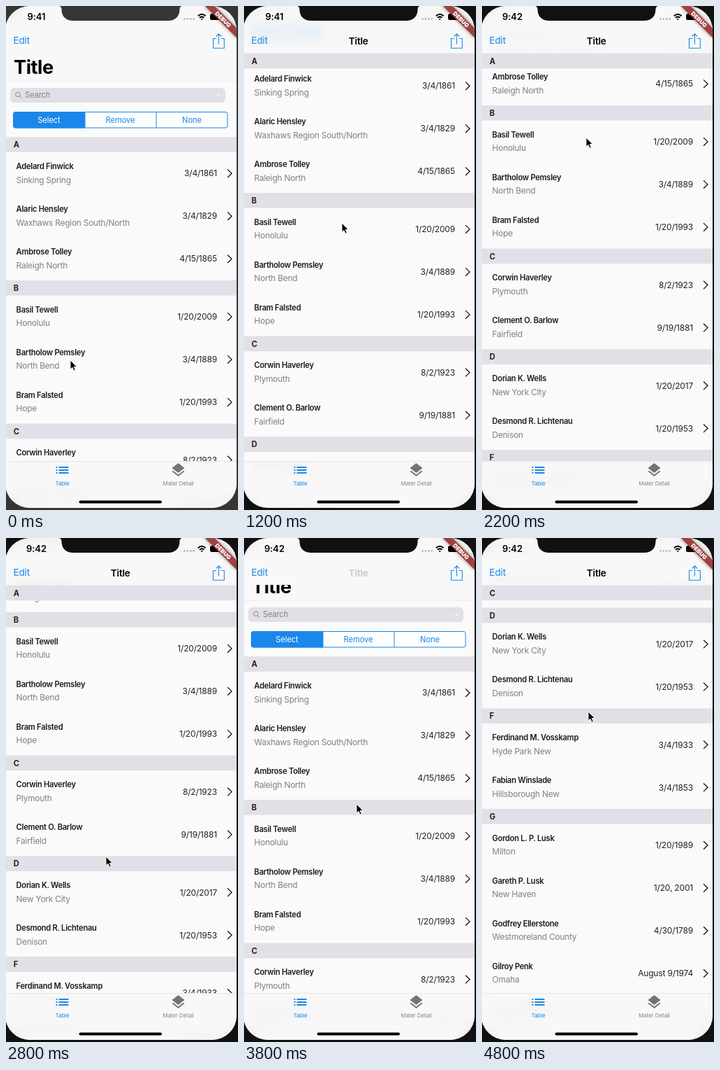
An HTML page that plays this animation: 332x720 px, repeating every 5 s.

```html
<!DOCTYPE html>
<html lang="en">
<head>
<meta charset="utf-8">
<title>List</title>
<style>
html, body { margin: 0; width: 100%; height: 100%; overflow: hidden; background: #111; }
#stage { position: absolute; left: 0; top: 0; width: 332px; height: 720px; overflow: hidden; }
#screen { position: absolute; left: -1px; top: 0; width: 331px; height: 717px; border-radius: 35px; overflow: hidden; background: #fafafa; }
svg { position: absolute; left: 0; top: 0; font-family: Inter, "Open Sans", sans-serif; }
#screen svg { left: 1px; }
.bar { position: absolute; left: 0; width: 331px; box-sizing: border-box; background: rgba(248,248,248,.92); -webkit-backdrop-filter: blur(8px); backdrop-filter: blur(8px); }
#nav { top: 0; border-bottom: 1px solid #ececee; }
#tabs { top: 650px; height: 67px; border-top: 1px solid #e6e6e8; }
.name { font-size: 11.2px; font-weight: 600; letter-spacing: -.3px; fill: #1c1c1e; }
.city { font-size: 12px; letter-spacing: -.28px; fill: #808082; }
.date { font-size: 12px; letter-spacing: -.18px; fill: #222; text-anchor: end; }
.letter { font-size: 11.2px; font-weight: 700; fill: #222; }
.seg { font-size: 11.2px; text-anchor: middle; letter-spacing: -.1px; }
.tab { font-size: 8px; text-anchor: middle; letter-spacing: -.1px; }
</style>
</head>
<body>
<div id="stage">
  <div id="screen">
    <svg id="list" width="331" height="717">
      <g id="search">
        <rect x="6" y="117" width="308" height="21" rx="6" fill="#e0e0e6"/>
        <g fill="none" stroke="#88888c">
          <circle cx="17" cy="126.3" r="3.3"/><path d="M19.4 128.7l3.2 3.2"/>
          <path d="M302.3 125.8l3.2 3.2m0-3.2l-3.2 3.2" stroke="#fff"/>
        </g>
        <text x="27" y="131" font-size="11.2" letter-spacing="-.15" fill="#808084">Search</text>
        <rect x="10.5" y="151.5" width="306.5" height="22.5" rx="3" fill="#fdfdfd" stroke="#1b87ea"/>
        <path d="M113 151.5H13.5a3 3 0 0 0-3 3V171a3 3 0 0 0 3 3H113zM215 151.5V174" fill="#1b87ea" stroke="#1b87ea"/>
        <text class="seg" x="61.5" y="166.7" fill="#fff">Select</text>
        <text class="seg" x="163.5" y="166.7" fill="#1b87ea">Remove</text>
        <text class="seg" x="266" y="166.7" fill="#1b87ea">None</text>
      </g>
      <g id="rows"></g>
      <g id="heads"></g>
    </svg>
    <div id="nav" class="bar"></div>
    <div id="tabs" class="bar"></div>
    <svg width="331" height="717">
      <clipPath id="below"><rect y="67" width="331" height="60"/></clipPath>
      <filter id="soft" x="-20%" y="-100%" width="140%" height="300%"><feGaussianBlur stdDeviation="2.4"/></filter>
      <g clip-path="url(#below)">
        <text id="big" x="11" font-size="27.2" font-weight="700" letter-spacing="-.5">Title</text>
      </g>
      <text x="10.5" y="53.7" font-size="13.6" letter-spacing="-.2" fill="#1b87ea">Edit</text>
      <text id="small" x="163.7" y="55" font-size="13.6" font-weight="600" letter-spacing="-.25" text-anchor="middle">Title</text>
      <path d="M301 46.5H296.5V60.3H312.3V46.5H307.8M304.4 54.5V40M300.7 43.5l3.7-3.7 3.7 3.7" fill="none" stroke="#1b87ea" stroke-width="1.1"/>

      <text id="clock" x="43.5" y="20" font-size="13" font-weight="600" letter-spacing="-.1" text-anchor="middle"></text>
      <path d="M255.5 18.5h14" stroke="#b8b8ba" stroke-width="2.8" stroke-linecap="round" stroke-dasharray="0 4.4"/>
      <g fill="none" stroke="#000" stroke-width="2">
        <path d="M274.8 14.2q5.4-5 10.8 0M277 16.8q3.2-2.9 6.4 0"/>
        <path d="M280.2 20.2l-1.6-1.6q1.6-1.3 3.2 0z" fill="#000" stroke="none"/>
      </g>
      <rect x="292" y="11" width="18" height="9" rx="2.5"/>
      <g transform="translate(330 0) rotate(45)">
        <rect x="-32" y="22.4" width="64" height="9.6" opacity=".5" filter="url(#soft)"/>
        <rect x="-32" y="22.4" width="64" height="9.6" fill="#a14040"/>
        <text y="30.2" font-size="8.2" font-weight="900" text-anchor="middle" fill="#fff">DEBUG</text>
      </g>

      <path d="M71.5 659h2m2 0h14M71.5 663h2m2 0h14M71.5 667h2m2 0h14" stroke="#1b87ea" stroke-width="2"/>
      <path d="M246.5 653l9 7-9 7-9-7zM239.1 663.8l7.4 5.7 7.4-5.7 1.6 1.3-9 7-9-7z" fill="#747476"/>
      <text class="tab" x="80.5" y="684.8" fill="#1b87ea">Table</text>
      <text class="tab" x="246.5" y="684.8" fill="#858587">Mater Detail</text>
      <rect x="104.5" y="706.4" width="118.5" height="4" rx="2"/>
    </svg>
  </div>
  <svg width="332" height="720">
    <path id="notch" d="M74 0C78.5 0 79.5 2 79.5 5C79.5 15 86 21 96 21H232C242 21 248.5 15 248.5 5C248.5 2 249.5 0 254 0Z"/>
    <path id="cursor" d="M0 0V13.2L3 10.4 5.1 15.2 7.4 14.2 5.3 9.5H9.4Z" stroke="#fff" stroke-width="1" stroke-linejoin="round"/>
  </svg>
</div>
<script>
const LOOP = 5000, STEP = 200;
const TOP = 187.2, HEAD = 21.7, ROW = 61, PIN = 67.5;

const sections = [
  ["A", ["Adelard Finwick", "Sinking Spring", "3/4/1861"],
        ["Alaric Hensley", "Waxhaws Region South/North", "3/4/1829"],
        ["Ambrose Tolley", "Raleigh North", "4/15/1865"]],
  ["B", ["Basil Tewell", "Honolulu", "1/20/2009"],
        ["Bartholow Pemsley", "North Bend", "3/4/1889"],
        ["Bram Falsted", "Hope", "1/20/1993"]],
  ["C", ["Corwin Haverley", "Plymouth", "8/2/1923"],
        ["Clement O. Barlow", "Fairfield", "9/19/1881"]],
  ["D", ["Dorian K. Wells", "New York City", "1/20/2017"],
        ["Desmond R. Lichtenau", "Denison", "1/20/1953"]],
  ["F", ["Ferdinand M. Vosskamp", "Hyde Park New", "3/4/1933"],
        ["Fabian Winslade", "Hillsborough New", "3/4/1853"]],
  ["G", ["Gordon L. P. Lusk", "Milton", "1/20/1989"],
        ["Gareth P. Lusk", "New Haven", "1/20, 2001"],
        ["Godfrey Ellerstone", "Westmoreland County", "4/30/1789"],
        ["Gilroy Penk", "Omaha", "August 9/1974"],
        ["Gaspard Mellowby", "Caldwell", "3/4/1885"]]
];

// Keys are [time, value, ...]
const scrollKeys = [[600, 0], [800, 40], [1000, 95], [1200, 125], [1400, 142], [1600, 150],
  [1800, 165], [2200, 250], [2400, 270], [2600, 281], [2800, 286], [3000, 215], [3200, 80],
  [3400, 0], [3600, 0], [3800, 18], [4000, 185], [4200, 185], [4400, 430], [4600, 640.7]];
const titleKeys = [[800, 0], [1000, 1], [3000, 1], [3400, 0], [3600, 0], [3800, .2], [4000, 1]];
const cursorKeys = [[0, 92, 506], [400, 105, 465], [800, 121, 378], [1000, 128, 330],
  [1200, 140, 310], [1600, 162, 461], [1800, 160, 425], [2200, 149, 188], [2800, 143, 455],
  [3200, 158, 600], [3600, 161, 400], [3800, 161, 380], [4000, 158, 230], [4200, 154, 400],
  [4400, 156, 440], [4800, 152, 248]];

const $ = id => document.getElementById(id);

function at(keys, t) {
  const i = keys.findIndex(k => k[0] >= t);
  if (i < 0) return keys[keys.length - 1].slice(1);
  if (i === 0) return keys[0].slice(1);
  const a = keys[i - 1], b = keys[i], u = (t - a[0]) / (b[0] - a[0]);
  return a.slice(1).map((v, n) => v + (b[n + 1] - v) * u);
}

function add(parent, tag, attrs, text = "") {
  const el = document.createElementNS("http://www.w3.org/2000/svg", tag);
  for (const k in attrs) el.setAttribute(k, attrs[k]);
  el.textContent = text;
  return parent.appendChild(el);
}

const heads = [];
let y = TOP;
for (const [letter, ...people] of sections) {
  const g = add($("heads"), "g", {});
  add(g, "rect", { x: -1, width: 331, height: HEAD, fill: "#e1e0e7" });
  add(g, "text", { class: "letter", x: 10.8, y: 15 }, letter);
  heads.push({ g, y });
  y += HEAD;
  for (const [name, city, date] of people) {
    const row = add($("rows"), "g", { transform: `translate(0 ${y})` });
    add(row, "text", { class: "name", x: 14.6, y: 24 }, name);
    add(row, "text", { class: "city", x: 14.6, y: 43.7 }, city);
    add(row, "text", { class: "date", x: 302, y: 34.6 }, date);
    add(row, "path", { d: "M317 24.5l6 5.8-6 5.8", fill: "none", stroke: "#111", "stroke-width": 1.3 });
    y += ROW;
  }
}

function draw(t) {
  const [s] = at(scrollKeys, t);
  const shift = `translate(0 ${-s})`;
  $("search").setAttribute("transform", shift);
  $("rows").setAttribute("transform", shift);
  heads.forEach((h, i) => {
    let top = Math.max(PIN, h.y - s);
    if (heads[i + 1]) top = Math.min(top, heads[i + 1].y - s - HEAD);
    h.g.setAttribute("transform", `translate(0 ${top})`);
  });
  $("nav").style.height = Math.max(67.5, 107.5 - s) + "px";
  $("big").setAttribute("y", 96.7 - s);
  $("small").setAttribute("opacity", at(titleKeys, t)[0]);
  $("clock").textContent = t < 2000 ? "9:41" : "9:42";
  const bezel = t < 400 ? "#353535" : "#111";
  $("stage").style.background = bezel;
  $("notch").setAttribute("fill", bezel);
  $("cursor").setAttribute("transform", `translate(${at(cursorKeys, t)})`);
}

const start = performance.now();
function tick() {
  const t = (performance.now() - start) % LOOP;
  draw(Math.floor(t / STEP) * STEP);
  requestAnimationFrame(tick);
}
tick();
</script>
</body>
</html>
```
